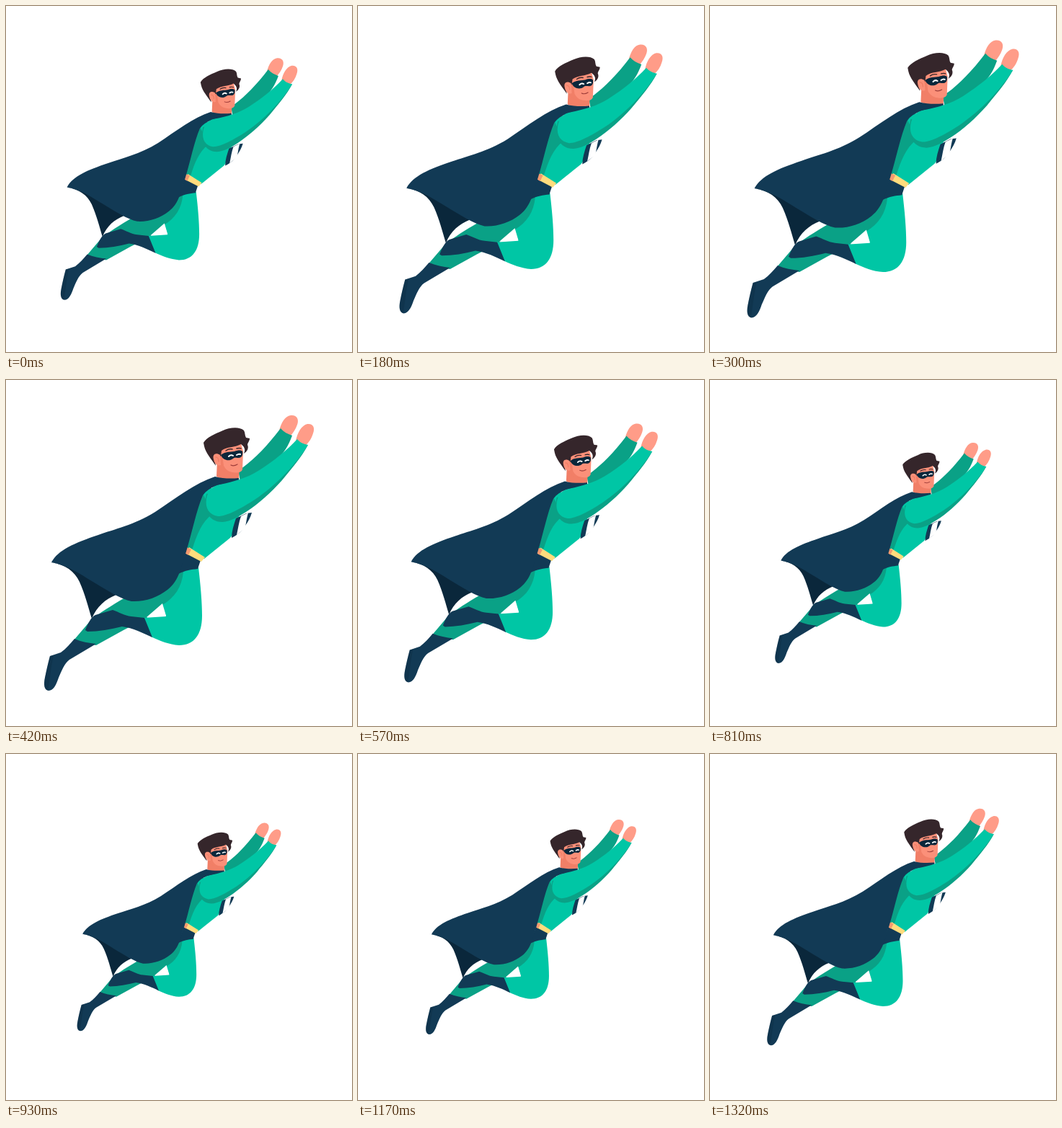
An HTML page that plays this animation: 480 by 480 pixels, repeating every 1350 ms.

```html
<!DOCTYPE html>
<html lang="en">
<head>
<meta charset="utf-8">
<title>Flying hero</title>
<style>
  html, body { margin: 0; width: 100%; height: 100%; overflow: hidden; background: #fff; }
  svg { display: block; width: 100vw; height: 100vh; }
  .green { fill: #00c6a5; }
  .shade { fill: #0aa186; }
  .navy { fill: #123a55; }
  .deep { fill: #0a273b; }
  .skin { fill: #ff9c88; }
  .face { fill: #fb9079; }
  .flush { fill: #f17f67; }
  .hair { fill: #35262b; }
  .belt { fill: #ffdc7d; }
  .white { fill: #fff; }
  .line { fill: none; stroke-linecap: round; }
</style>
</head>
<body>
<svg viewBox="0 0 480 480">
  <g id="hero">
    <!-- back leg -->
    <path class="shade" d="M165 302C148 312 128 324 117 334L94 361L125 368L163 347L194 331L219 309L242 270Z"/>
    <path class="navy" d="M95 359C104 363 115 365 125 366L88 388C81 393 77 404 73 413C70 422 66 431 59 431C53 430 52 423 54 413C56 403 58 394 61 383L76 378C83 373 89 366 95 359Z"/>
    <path class="deep" d="M61 383L66 382C62 399 61 416 58 431C53 429 52 423 54 413C56 403 58 394 61 383Z" opacity=".3"/>
    <!-- cape lining -->
    <path class="deep" d="M63 253C82 256 95 265 102 280C110 298 114 315 119 331C126 314 138 304 153 298C132 280 101 258 63 253Z"/>
    <!-- back arm -->
    <path class="skin" d="M379 70C382 59 387 50 395 49C403 48 407 54 404 62C402 68 398 74 394 78Z"/>
    <path class="shade" d="M381 67C385 72 391 75 397 77C392 91 386 101 375 111L326 146L322 125L329 121C345 109 362 92 381 67Z"/>
    <!-- torso and chest badge -->
    <path class="green" d="M273 150L326 150L323 190C320 202 317 212 311 219L275 248L244 240Z"/>
    <path class="shade" d="M270 150L286 186C271 198 265 214 258 236L244 240Z"/>
    <path class="navy" d="M319 192L333 185L341 184C339 191 336 196 332 202C328 209 321 215 313 219C313 210 316 201 319 192Z"/>
    <path class="white" d="M326 189L336 184C333 195 333 202 331 206L320 215C322 206 323 197 326 189Z"/>
    <!-- front leg -->
    <path class="green" d="M242 262L267 260C270 286 272 308 272 327C272 353 261 368 240 368C226 367 214 362 201 356L191 330L222 328L216 309C229 298 238 286 242 262Z"/>
    <path class="shade" d="M238 265L246 266C244 287 234 302 217 312L213 303Z"/>
    <path class="white" d="M217 310L222 327L195 329Z"/>
    <path class="navy" d="M110 347C114 337 118 329 124 326L148 319C157 322 164 327 174 328L192 330L203 357C190 351 176 344 161 342C145 346 129 349 113 349Z"/>
    <!-- trunks and belt -->
    <path class="navy" d="M249 239L270 250L266 262C257 263 249 264 239 269Z"/>
    <path class="belt" d="M254 232L276 246L271 252L250 241Z"/>
    <path d="M251 232L257 235L253 243L248 240Z" fill="#f39a70"/>
    <!-- neck -->
    <path class="flush" d="M293 112L324 116L323 138C313 142 302 139 292 134Z"/>
    <!-- cape -->
    <path class="navy" d="M290 134C301 137 313 137 323 136L323 144C302 143 283 146 273 160C264 181 258 212 250 238C243 258 241 278 224 291C210 302 192 308 174 307C159 304 139 291 119 279C101 268 85 257 63 253C72 236 95 226 128 215C150 207 178 201 207 183C236 164 262 143 290 134Z"/>
    <!-- front arm -->
    <path class="shade" d="M278 158C273 178 280 197 300 197C312 196 322 190 333 183C350 172 368 156 383 139C397 122 410 107 419 90L350 145Z"/>
    <path class="skin" d="M402 85C404 73 410 63 418 61C426 60 429 66 426 74C424 81 420 87 415 91Z"/>
    <path class="green" d="M404 82C408 87 413 89 419 90C402 117 375 146 345 166C326 178 307 189 294 189C282 187 276 178 278 165C280 154 285 147 297 145C316 141 334 136 350 126C372 112 389 98 404 82Z"/>
    <!-- head -->
    <path class="face" d="M292 95L326 88L329 99L328 124C326 129 320 129 313 128C305 127 300 123 296 118Z"/>
    <path class="flush" d="M293 102L300 104L302 119C305 125 310 128 318 129C308 130 299 127 294 119Z"/>
    <path class="hair" d="M274 87C278 80 289 75 301 70C309 66 324 64 330 70C332 73 331 77 333 80L338 81C338 85 335 87 335 90C337 94 335 99 330 102C333 96 330 92 326 89C317 94 307 92 299 98L298 106L294 103C289 104 289 109 291 119C285 110 277 101 275 92Z"/>
    <path class="face" d="M297 104C291 100 286 103 288 110C289 116 293 120 298 118Z"/>
    <path class="line" d="M291 107Q295 107 295 113" stroke="#f17f67" stroke-width="1.5"/>
    <path class="deep" d="M298 104C304 99 311 100 317 99C322 97 326 97 328 99C329 104 327 108 323 108C319 108 317 107 315 109C310 113 301 112 298 104Z"/>
    <path class="line" d="M309 106Q312 103 315 105M320 104Q323 102 325 103" stroke="#fff" stroke-width="2"/>
    <path class="line" d="M305 98Q309 95 314 96M320 95Q324 94 326 95" stroke="#35262b" stroke-width="1.4"/>
    <path class="line" d="M312 118Q316 120 321 117" stroke="#9e3d3a" stroke-width="1.2"/>
  </g>
</svg>
<script>
  const LOOP = 1350, STEP = 30, SWING = 0.15, DRAWN = 1.139;
  const hero = document.getElementById("hero");
  const start = performance.now();

  // The hero swells and shrinks around the stage centre.
  function render(ms) {
    const t = Math.floor((ms + 0.5) / STEP) * STEP % LOOP;
    const scale = (1 + SWING * Math.sin(2 * Math.PI * t / LOOP)) / DRAWN;
    hero.setAttribute("transform", `translate(240 240) scale(${scale}) translate(-240 -240)`);
  }

  function tick() {
    render(performance.now() - start);
    requestAnimationFrame(tick);
  }

  render(0);
  requestAnimationFrame(tick);
</script>
</body>
</html>
```
